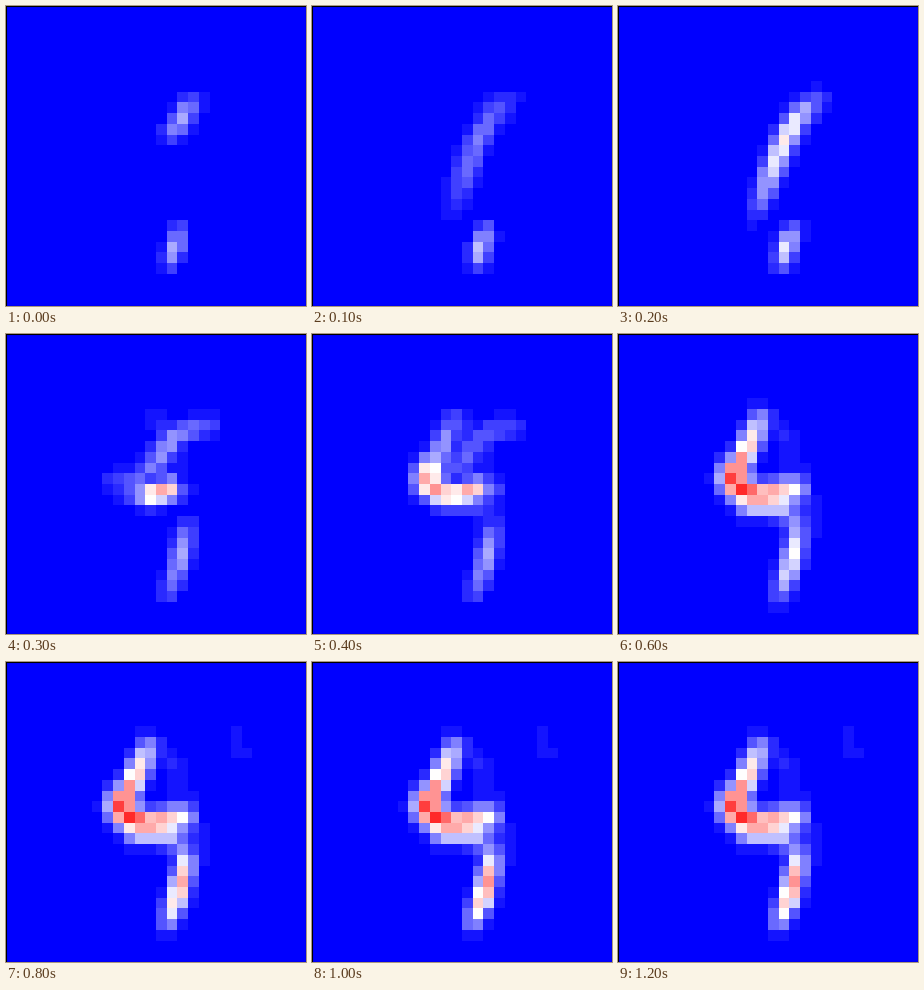
These frames come from a looping animation (300x300 px, 8 s). A matplotlib script:

```python
import math

import numpy as np
import matplotlib.pyplot as plt
from matplotlib.animation import FuncAnimation

GRID, STEP_MS, LOOP_MS = 28, 100, 8000
LEVELS = 12
COLS, ROWS = np.meshgrid(np.arange(GRID), np.arange(GRID))


def brush(sigma, *controls):
    """Soft Bezier stroke; each control is (column, row, strength)."""
    t = np.linspace(0, 1, 60)[:, None]
    n = len(controls) - 1
    x, y, strength = sum(
        math.comb(n, k) * t ** k * (1 - t) ** (n - k) * np.array(c)
        for k, c in enumerate(controls)).T
    d2 = (COLS[..., None] - x) ** 2 + (ROWS[..., None] - y) ** 2
    return (strength * np.exp(-d2 / (2 * sigma ** 2))).max(axis=-1)


def ramp(ms, start, end):
    return min(max((ms - start) / (end - start), 0), 1)


def rise(start, end):
    return lambda ms: ramp(ms, start, end)


def pulse(start, peak, end):
    return lambda ms: ramp(ms, start, peak) * (1 - ramp(ms, peak, end))


def foot_gain(ms):
    return (0.8 + 0.3 * ramp(ms, 0, 200)) * (1 - ramp(ms, 200, 300))


def tail_gain(ms):
    return 0.45 * ramp(ms, 200, 300) + 0.55 * ramp(ms, 400, 850)


# Each part is a stroke with its gain over time.
PARTS = [
    # opening spots and the slanted line they grow into
    (brush(.72, (17, 8.2, .15), (16.1, 9.9, 1.25), (14.4, 12, .05)),
     pulse(-100, 0, 200)),
    (brush(.65, (15.8, 20.2, .3), (15.2, 22.2, 1.6), (14.7, 24, .05)),
     foot_gain),
    (brush(.75, (18.5, 8, .15), (14.6, 10.2, 1.7), (14.2, 15.3, 1.05),
           (12, 19.5, .05)), pulse(0, 200, 300)),
    # passing sweep and the knot in the middle
    (brush(.75, (18.5, 8.2, .3), (13, 8.2, .95), (15, 13.2, .5),
           (9.8, 13.2, .3)), pulse(200, 300, 600)),
    (brush(.75, (12.7, 14.5, 1.2), (13.6, 14.4, 1.6), (14.8, 14, 1.2)),
     rise(200, 300)),
    # the digit: arc, elbow, bar, link, tail
    (brush(.75, (12.8, 7.4, .6), (11.85, 9.7, 1.52), (10.6, 12.2, 1.5)),
     rise(300, 500)),
    (brush(.88, (10.6, 12, 1.5), (9.5, 13.4, 2.2), (11.9, 14.4, 1.75)),
     rise(300, 430)),
    (brush(.82, (11.5, 14.3, 1.8), (13.8, 15, 1.45), (16, 14, 1)),
     rise(200, 600)),
    (brush(.65, (11.6, 15.7, .9), (16.5, 15.5, .75), (16.3, 18.2, .5)),
     rise(300, 600)),
    (brush(.68, (16.3, 17.6, .8), (15.9, 20.8, 2.3), (14.5, 24, .5)),
     tail_gain),
    # faint haze
    (brush(.6, (17, 12.5, .15), (17.3, 16, .2), (17, 21, .15)),
     rise(200, 600)),
    (brush(.8, (13.5, 7.8, .15), (16, 8.5, .2), (15.5, 11.5, .12)),
     rise(200, 300)),
    (brush(.5, (21, 6, .1), (21, 8, .1), (21.5, 8, .1)), rise(600, 800)),
]


def field_at(ms):
    field = np.maximum.reduce([gain(ms) * shape for shape, gain in PARTS])
    return np.floor(field * LEVELS + 0.3) / LEVELS


fig = plt.figure(figsize=(3, 3), dpi=100)
ax = fig.add_axes([0, 0, 1, 1])
ax.set(xticks=[], yticks=[])
image = ax.imshow(field_at(0), cmap="bwr", vmin=0, vmax=2,
                  interpolation="nearest", aspect="auto")


def update(frame):
    image.set_data(field_at(frame * STEP_MS))
    return image,


anim = FuncAnimation(fig, update, frames=LOOP_MS // STEP_MS,
                     interval=STEP_MS, repeat=True, repeat_delay=0)
plt.show()
```
